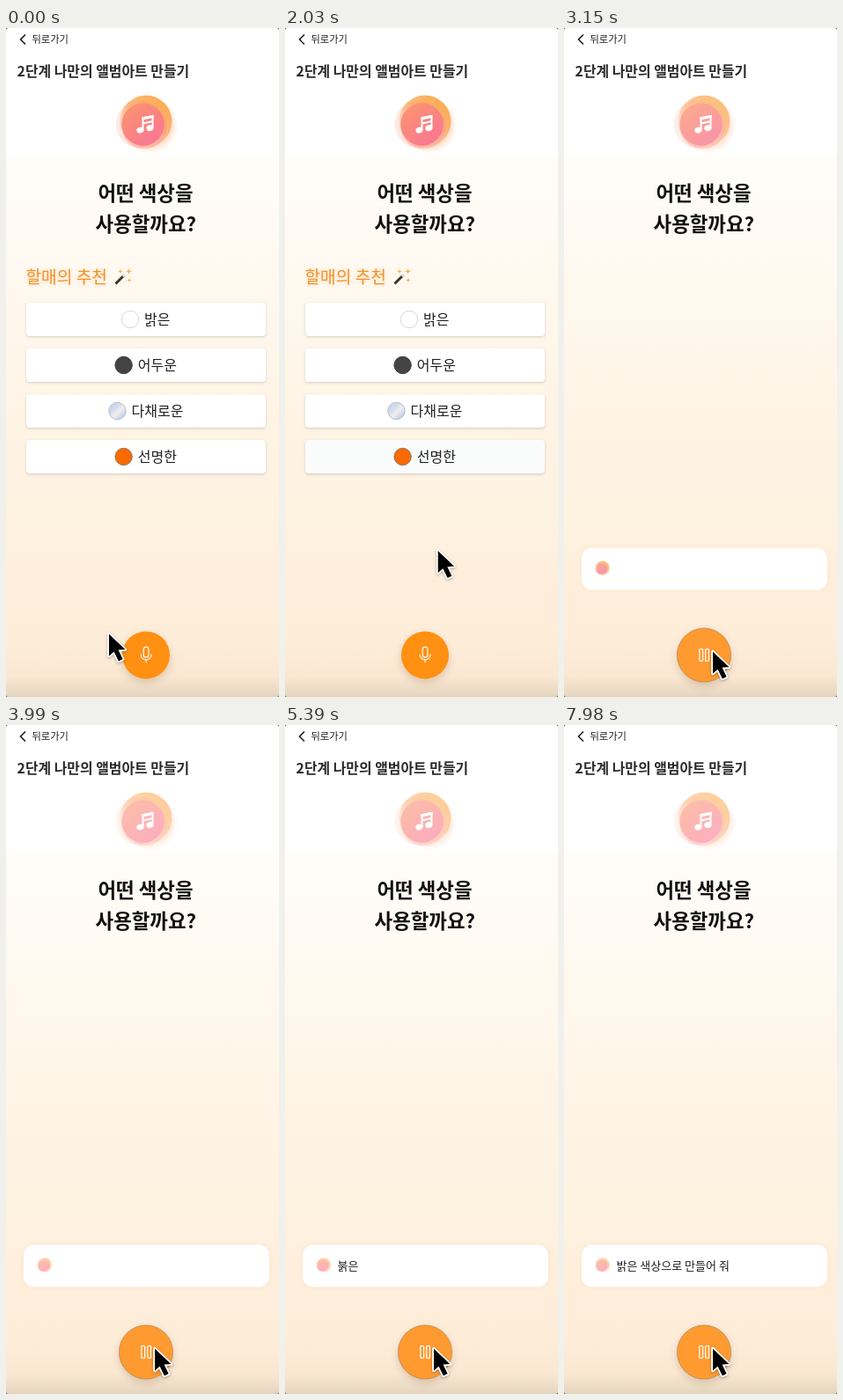
An HTML page with a canvas for the animation above (8000 ms loop, 310x760 px).

```html
<!DOCTYPE html>
<html lang="ko">
<head>
<meta charset="utf-8">
<style>
html, body { margin: 0; width: 100%; height: 100%; overflow: hidden; background: #fff; }
canvas { display: block; width: 310px; height: 760px; }
</style>
</head>
<body>
<canvas id="stage"></canvas>
<script>
const W = 310, H = 760, LOOP = 8000, LISTEN = 2500, PULSE = 2700;
const FONT = '"Noto Sans CJK KR", "Noto Sans KR", "Noto Sans CJK JP", "Noto Sans CJK", sans-serif';
const dpr = window.devicePixelRatio || 1;
const canvas = document.getElementById('stage');
canvas.width = W * dpr;
canvas.height = H * dpr;
const ctx = canvas.getContext('2d');

const clamp = v => Math.max(0, Math.min(1, v));
const ramp = (t, a, b) => clamp((t - a) / (b - a));
const smooth = p => p * p * (3 - 2 * p);
const mix = (a, b, p) => a + (b - a) * p;
const mixColor = (a, b, p) => `rgb(${a.map((v, i) => Math.round(mix(v, b[i], p)))})`;

function text(str, x, cy, size, weight = 400, color = '#1d1d1f', align = 'left') {
  ctx.font = `${weight} ${size}px ${FONT}`;
  ctx.textAlign = align;
  ctx.fillStyle = color;
  ctx.fillText(str, x, cy + size * 0.37);
}

function disc(c, x, y, r, fill) {
  c.beginPath();
  c.arc(x, y, r, 0, Math.PI * 2);
  c.fillStyle = fill;
  c.fill();
}

function box(x, y, w, h, r) {
  ctx.beginPath();
  ctx.roundRect(x, y, w, h, r);
}

function line(points, width, color, c = ctx) {
  c.beginPath();
  points.forEach(([x, y]) => c.lineTo(x, y));
  c.lineWidth = width;
  c.strokeStyle = color;
  c.stroke();
}

function shadow(color, blur, dy) {
  ctx.shadowColor = color;
  ctx.shadowBlur = blur * dpr;
  ctx.shadowOffsetY = dy * dpr;
}

function gradient(c, x0, y0, x1, y1, stops) {
  const g = c.createLinearGradient(x0, y0, x1, y1);
  stops.forEach(([at, color]) => g.addColorStop(at, color));
  return g;
}

// Glowing orb, 80 x 80 units, centred on (40, 40)
function makeOrb(withNote) {
  const layer = document.createElement('canvas');
  layer.width = layer.height = 80 * dpr;
  const c = layer.getContext('2d');
  c.scale(dpr, dpr);
  const halo = c.createRadialGradient(47, 42, 22, 47, 42, 32);
  halo.addColorStop(0, 'rgba(253,185,140,.5)');
  halo.addColorStop(1, 'rgba(253,200,160,0)');
  disc(c, 47, 42, 32, halo);
  disc(c, 34.5, 40, 27, gradient(c, 8, 40, 60, 40, [[0, 'rgba(250,180,150,.25)'], [1, 'rgba(250,140,130,.5)']]));
  disc(c, 42, 37, 29.5, gradient(c, 58, 10, 24, 62, [[0, 'rgba(250,165,60,.9)'], [0.45, 'rgba(251,160,90,.7)'], [0.85, 'rgba(252,175,150,.25)'], [1, 'rgba(252,175,150,.15)']]));
  disc(c, 40, 43, 25.5, 'rgba(250,140,120,.35)');
  disc(c, 38.5, 40.5, 24.2, gradient(c, 22, 22, 54, 60, [[0, '#fa9272'], [0.5, '#fb8480'], [1, '#f97894']]));
  if (withNote) {
    c.fillStyle = '#fff';
    [[35.4, 47], [46.4, 44.6]].forEach(([x, y]) => {
      c.beginPath();
      c.ellipse(x, y, 4.1, 3.4, -0.3, 0, Math.PI * 2);
      c.fill();
    });
    line([[38.5, 47], [38.5, 33.4], [49.5, 31], [49.5, 44.6]], 2, '#fff', c);
    line([[37.5, 34], [50.5, 31.2]], 3, '#fff', c);
    line([[38.5, 39.4], [49.5, 37]], 2, '#fff', c);
  }
  return layer;
}

const orb = makeOrb(true), smallOrb = makeOrb(false);

function drawOrb(img, x, y, scale, alpha) {
  ctx.globalAlpha = alpha;
  ctx.drawImage(img, x - 40 * scale, y - 40 * scale, 80 * scale, 80 * scale);
  ctx.globalAlpha = 1;
}

const backdrop = gradient(ctx, 0, 0, 0, H, [
  [0, '#fff'], [0.185, '#fff'], [0.2, '#fffcf8'], [0.35, '#fff9f1'], [0.55, '#fef5e6'],
  [0.77, '#fef1df'], [0.81, '#feeedb'], [0.93, '#fdecd8'], [0.97, '#fae7d2'], [1, '#e4d4be']
]);

function drawPage(pulse) {
  ctx.fillStyle = '#77716a';
  ctx.fillRect(0, 0, W, H);
  box(0, 0, W, H, 3);
  ctx.fillStyle = backdrop;
  ctx.fill();
  line([[22, 7.5], [16.5, 13], [22, 18.5]], 1.6, '#1d1d1f');
  text('뒤로가기', 29.4, 12.7, 11.3, 500);
  text('2단계 나만의 앨범아트 만들기', 12.5, 49, 15.9, 600, '#2a2a2c');
  drawOrb(orb, 157, 109, 1, pulse);
  text('어떤 색상을', 158.5, 188, 22.4, 600, '#111', 'center');
  text('사용할까요?', 158.8, 223, 22.4, 600, '#111', 'center');
}

function sparkle(x, y, r) {
  ctx.beginPath();
  for (let i = 0; i < 8; i++) {
    const a = i * Math.PI / 4, d = i % 2 ? r * 0.36 : r;
    ctx.lineTo(x + Math.cos(a) * d, y + Math.sin(a) * d);
  }
  ctx.fillStyle = '#f6b45c';
  ctx.fill();
}

const rainbow = gradient(ctx, 118, 427, 135, 444, [
  [0, '#c3d2ee'], [0.35, '#d5def0'], [0.55, '#f3eee8'], [0.75, '#cfdcf2'], [1, '#b4c8ea']
]);
const options = [
  { label: '밝은', dot: '#fff', rim: '#d8d8d8', x: 141 },
  { label: '어두운', dot: '#444', rim: '#3a3a3a', x: 133.6 },
  { label: '다채로운', dot: rainbow, rim: '#b9bec8', x: 126.5 },
  { label: '선명한', dot: '#fb6a00', rim: '#8f7a68', x: 133.6 }
];

function drawOptions(hover) {
  shadow('rgba(240,150,50,.35)', 4, 1);
  text('할매의 추천', 22.4, 283, 19.2, 500, '#f0922b');
  shadow('transparent', 0, 0);
  line([[124.5, 290.5], [134, 281]], 3, '#3b3330');
  line([[132.8, 282.2], [135, 280]], 3, '#e4ddd6');
  sparkle(130, 276.5, 3);
  sparkle(139.5, 276.5, 3.6);
  sparkle(140, 286.5, 2.8);

  options.forEach((o, i) => {
    const y = 312 + i * 52;
    shadow('rgba(0,0,0,.17)', 3, 1);
    box(23, y, 272, 38, 4);
    ctx.fillStyle = i === 3 ? mixColor([255, 255, 255], [241, 243, 244], hover) : '#fff';
    ctx.fill();
    shadow('transparent', 0, 0);
    disc(ctx, o.x, y + 19, 9.7, o.dot);
    ctx.strokeStyle = o.rim;
    ctx.lineWidth = 1;
    ctx.stroke();
    text(o.label, o.x + 16.1, y + 19, 16, 400, '#202022');
  });
}

const phrases = [[5180, '붉은'], [5740, '밝은 색상으로'], [6160, '밝은 색상으로 만들어 줘']];

function drawBar(t, pulse) {
  const p = 1 - Math.pow(1 - ramp(t, LISTEN, LISTEN + 330), 1.3);
  const h = mix(20, 48, p), y = 638.5 - h;
  ctx.globalAlpha = p;
  shadow('rgba(225,170,110,.16)', 4, 0);
  box(20, y, 279, h, 12);
  ctx.fillStyle = '#fff';
  ctx.fill();
  shadow('transparent', 0, 0);
  ctx.globalAlpha = 1;
  drawOrb(smallOrb, 43.2, y + h / 2 - 0.5, 0.265, pulse * p);
  const said = phrases.filter(([at]) => t >= at).pop();
  if (said) text(said[1], 59.5, 614, 13);
}

function drawButton(hover, listening) {
  shadow('rgba(120,70,10,.22)', 10, 4);
  disc(ctx, 159, 712.4, mix(27, 30.6, hover), mixColor([255, 144, 18], [255, 154, 48], hover));
  shadow('transparent', 0, 0);
  ctx.strokeStyle = `rgba(150,125,95,${0.55 * hover})`;
  ctx.lineWidth = 1;
  ctx.stroke();
  ctx.strokeStyle = '#fff';
  ctx.lineWidth = 1.2;
  if (listening) {
    [153.8, 160.7].forEach(x => {
      box(x, 705.4, 3.8, 13.8, 1);
      ctx.stroke();
    });
    return;
  }
  box(156.2, 703.2, 5.8, 11.6, 2.9);
  ctx.stroke();
  ctx.beginPath();
  ctx.arc(159.1, 711.6, 6, 0, Math.PI);
  ctx.stroke();
  line([[159.1, 717.6], [159.1, 721]], 1.2, '#fff');
}

const arrow = new Path2D('M2 3.5V28.5L7.6 23.4L12.8 34.2L17.6 32L12.6 21.6L20.4 21Z');
const hand = new Path2D('M5.5 5Q5 1.5 8 1.5Q10 1.5 11 4.5L13.4 12.5Q16 9.8 18 12.8Q20.8 10.6 22.6 13.8Q26.6 12.6 27.4 17L29.4 24Q29.8 29 27 33.5L14 34.2L5.6 25.4Q1.2 20.6 3 18.4Q5.4 16.4 9.4 20Z');
const knuckles = new Path2D('M15.4 22V29M19.3 21.5V28.8M23.2 21V28.4');
const track = [
  [30, 115, 685], [280, 134, 686], [385, 134, 686], [1050, 181, 466],
  [1330, 177, 463], [1785, 177, 463], [2260, 167, 705]
];

function cursorAt(t) {
  const next = track.findIndex(k => k[0] > t);
  if (next === 0) return track[0].slice(1);
  if (next < 0) return track[track.length - 1].slice(1);
  const a = track[next - 1], b = track[next];
  const p = smooth(ramp(t, a[0], b[0]));
  return [mix(a[1], b[1], p), mix(a[2], b[2], p)];
}

function drawCursor(t) {
  const [x, y] = cursorAt(t);
  const pointing = t >= 2200 && t < 2940;
  ctx.save();
  ctx.translate(x, y);
  ctx.lineJoin = 'round';
  shadow('rgba(0,0,0,.3)', 3, 1);
  if (pointing) {
    ctx.translate(-1, 6);
    ctx.fillStyle = '#fff';
    ctx.fill(hand);
    shadow('transparent', 0, 0);
    ctx.strokeStyle = '#111';
    ctx.lineWidth = 2;
    ctx.stroke(hand);
    ctx.lineWidth = 1.6;
    ctx.stroke(knuckles);
  } else {
    ctx.strokeStyle = '#fff';
    ctx.lineWidth = 3.6;
    ctx.stroke(arrow);
    shadow('transparent', 0, 0);
    ctx.fillStyle = '#000';
    ctx.fill(arrow);
  }
  ctx.restore();
}

function draw(t) {
  const listening = t >= LISTEN;
  const pulse = 0.75 + 0.25 * Math.cos(Math.max(0, t - PULSE) / 1000 * Math.PI);
  ctx.setTransform(dpr, 0, 0, dpr, 0, 0);
  drawPage(pulse);
  if (listening) drawBar(t, pulse);
  else drawOptions(ramp(t, 865, 1015) - ramp(t, 1935, 2085));
  drawButton(smooth(ramp(t, 2180, 2330)), listening);
  drawCursor(t);
}

const start = performance.now();
function tick() {
  draw((performance.now() - start) % LOOP);
  requestAnimationFrame(tick);
}
tick();
</script>
</body>
</html>
```
